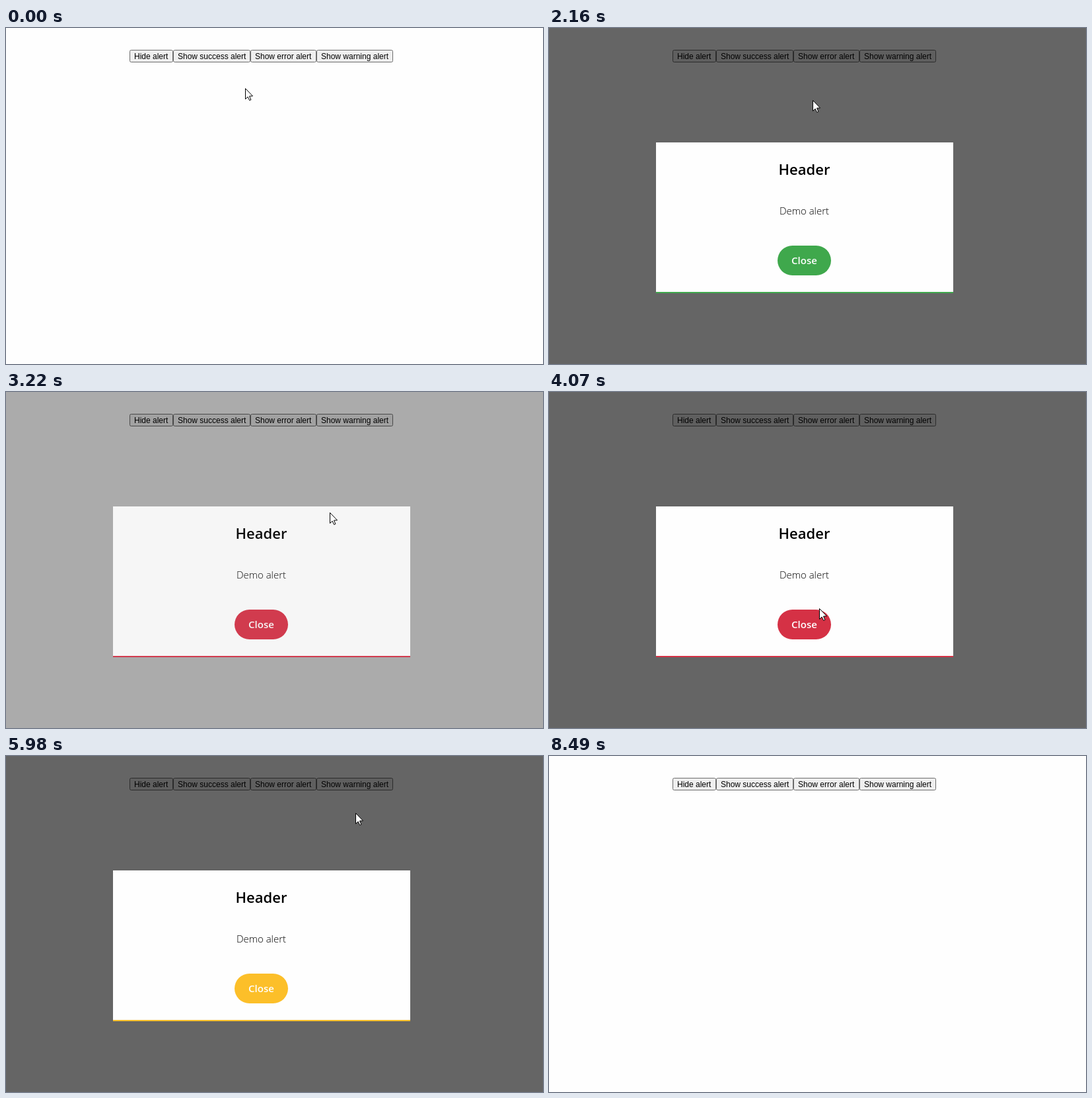
Animation of 813 by 508 pixels, one loop 8630 ms. Source, as an HTML page with a canvas:

```html
<!DOCTYPE html>
<html lang="en">
<head>
<meta charset="utf-8">
<title>Alert demo</title>
<style>
  html, body { margin: 0; width: 100%; height: 100%; overflow: hidden; background: #fefefe; }
  canvas { display: block; }
</style>
</head>
<body>
<canvas id="stage" width="813" height="508"></canvas>
<script>
const W = 813, H = 508, LOOP = 8630, FADE = 295;
const TICK = LOOP / 64, LEAD = 20;
const ctx = document.getElementById('stage').getContext('2d');
const layer = document.createElement('canvas');
layer.width = W;
layer.height = H;
const layerCtx = layer.getContext('2d');

const BUTTON_FONT = '12px "Liberation Sans", Arial, sans-serif';
const ALERT_FONT = '"Open Sans", "Noto Sans", sans-serif';

const BUTTONS = [
  { text: 'Hide alert', left: 187, width: 66 },
  { text: 'Show success alert', left: 253, width: 117 },
  { text: 'Show error alert', left: 370, width: 100 },
  { text: 'Show warning alert', left: 470, width: 116 }
];

// Alerts fade in and vanish at once
const ALERTS = [
  { from: 917, to: 2280, color: '#3fa84c' },
  { from: 3074, to: 4580, color: '#d53145' },
  { from: 5500, to: 7060, color: '#fcbf29' }
];

// Pointer moves between the places it visits, resting in the gaps
const START = { x: 362, y: 91 };
const CLOSE = { x: 395, y: 351 };
const MOVES = [
  { from: 0, to: 675, x: 333, y: 44 },
  { from: 1350, to: 2150, x: 399, y: 109 },
  { from: 2560, to: 3060, x: 430, y: 45 },
  { from: 3060, to: 3230, x: 490, y: 182 },
  { from: 3230, to: 4300, ...CLOSE },
  { from: 4600, to: 5255, x: 549, y: 56 },
  { from: 5255, to: 5450, x: 548, y: 45 },
  { from: 5700, to: 6605, x: 430, y: 296 },
  { from: 6605, to: 7000, ...CLOSE },
  { from: 7100, to: 7420, x: 690, y: 258 },
  { from: 7750, to: 8490, x: 787, y: 510 }
];

const clamp = v => Math.min(1, Math.max(0, v));
const smooth = k => k * k * (3 - 2 * k);

function pointerAt(t) {
  let { x, y } = START;
  for (const m of MOVES) {
    const k = smooth(clamp((t - m.from) / (m.to - m.from)));
    x += (m.x - x) * k;
    y += (m.y - y) * k;
  }
  return [Math.round(x), Math.round(y)];
}

function label(c, text, x, y, font, color, align) {
  c.font = font;
  c.fillStyle = color;
  c.textAlign = align;
  c.fillText(text, x, y);
}

function drawPage() {
  ctx.fillStyle = '#fefefe';
  ctx.fillRect(0, 0, W, H);
  ctx.lineWidth = 1;
  for (const { text, left, width } of BUTTONS) {
    ctx.beginPath();
    ctx.roundRect(left + 0.5, 33.5, width - 1, 18, 2);
    ctx.fillStyle = '#efefef';
    ctx.fill();
    ctx.strokeStyle = '#6c6c6c';
    ctx.stroke();
    label(ctx, text, left + 7, 47, BUTTON_FONT, '#000', 'left');
  }
}

function drawAlert(alert, t) {
  const p = clamp((t - alert.from) / FADE);
  ctx.fillStyle = `rgba(0, 0, 0, ${0.6 * p})`;
  ctx.fillRect(0, 0, W, H);

  const c = layerCtx, middle = 386.5;
  c.clearRect(0, 0, W, H);
  c.fillStyle = '#fefefe';
  c.fillRect(162, 173, 450, 226);
  c.fillStyle = alert.color;
  c.fillRect(162, 399, 450, 2);
  c.beginPath();
  c.roundRect(346, 329, 81, 45, 22.5);
  c.fill();
  label(c, 'Header', middle, 222, '600 22px ' + ALERT_FONT, '#000', 'center');
  label(c, 'Demo alert', middle, 282, '300 15px ' + ALERT_FONT, '#000', 'center');
  label(c, 'Close', middle, 357, '600 15px ' + ALERT_FONT, '#fefefe', 'center');

  ctx.globalAlpha = 1 - (1 - p) ** 3;
  ctx.drawImage(layer, 0, 0);
  ctx.globalAlpha = 1;
}

function drawPointer(x, y) {
  ctx.save();
  ctx.translate(x + 0.5, y + 0.5);
  ctx.fillStyle = '#fff';
  ctx.strokeStyle = '#000';
  ctx.lineWidth = 1;
  const arrow = new Path2D('M0 0V16L3.6 12.6 6.2 18 8.4 17 6 11.6 11 11.4Z');
  ctx.fill(arrow);
  ctx.stroke(arrow);
  ctx.restore();
}

function frame() {
  const now = performance.now() % LOOP;
  const t = Math.floor((now + LEAD) / TICK) * TICK % LOOP;
  drawPage();
  const alert = ALERTS.find(a => t > a.from && t < a.to);
  if (alert) drawAlert(alert, t);
  drawPointer(...pointerAt(t));
  requestAnimationFrame(frame);
}
frame();
</script>
</body>
</html>
```
